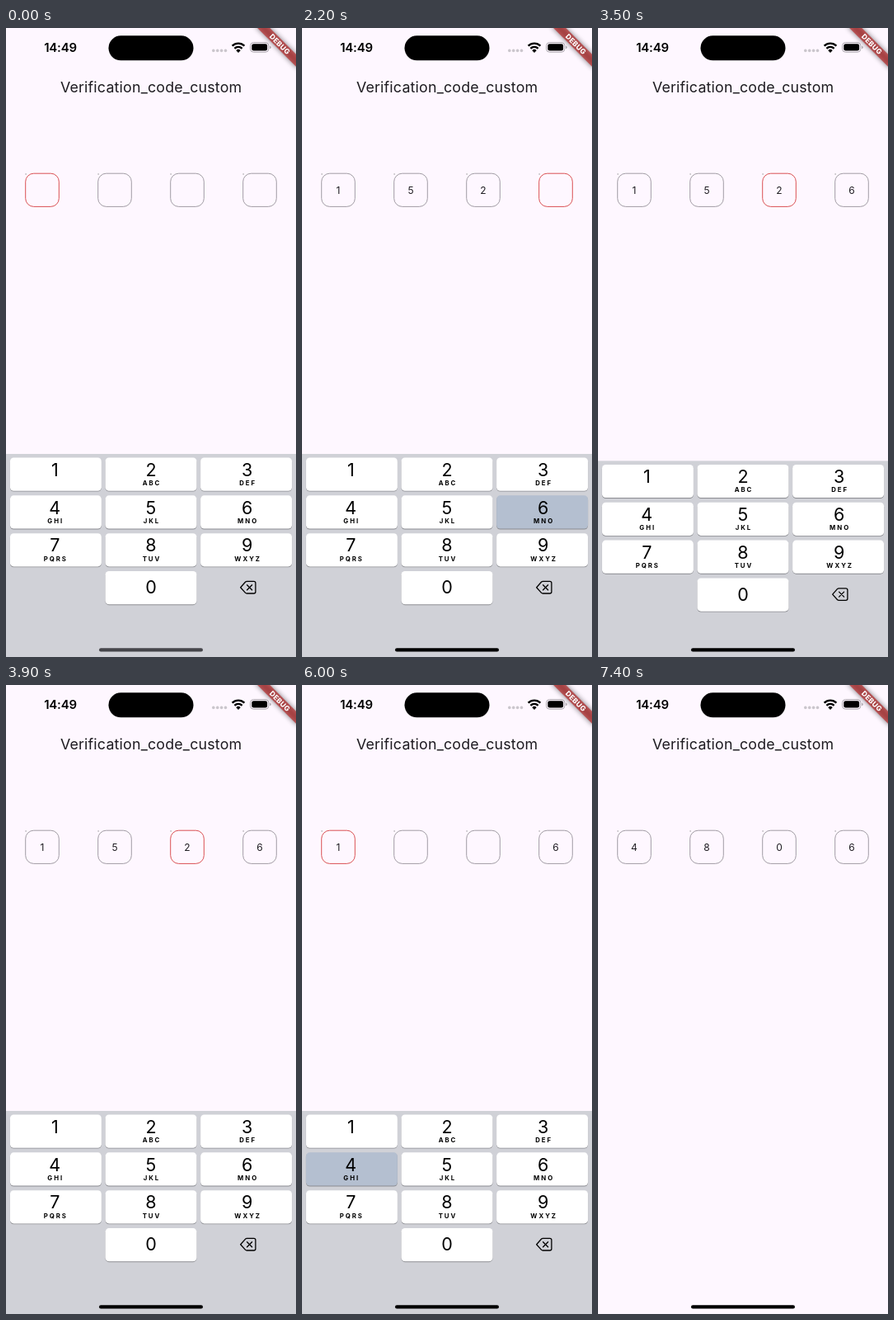
Recreate the animation shown at these times as an HTML page. Size 352 by 762 pixels, loop 8 s.

```html
<!DOCTYPE html>
<html lang="en">
<head>
<meta charset="utf-8">
<title>Verification code</title>
<style>
  html, body { margin: 0; width: 100%; height: 100%; overflow: hidden; background: #fef7ff; }
  svg { display: block; width: 100%; height: 100%; }
  text { font-family: Inter, "Open Sans", sans-serif; text-anchor: middle; fill: #000; }
  .title { font-size: 17.8px; letter-spacing: .2px; fill: #1d1b20; }
  .clock { font-size: 15px; font-weight: 600; letter-spacing: -.2px; }
  .banner { font-size: 9.6px; font-weight: 800; letter-spacing: .3px; fill: #fff; }
  .cell rect { fill: none; stroke: #a19ca4; }
  .cell.focused rect { stroke: #da5053; }
  .cell text { font-size: 12px; fill: #1d1b20; }
  .key rect { fill: #fff; }
  .key .edge { fill: #8b8c91; }
  .key.pressed .face { fill: #b4bfd0; }
  .digit { font-size: 21.5px; }
  .letters { font-size: 7.8px; font-weight: 700; letter-spacing: 2px; }
  .line { fill: none; stroke: #000; }
</style>
</head>
<body>
<svg viewBox="0 0 352 762">
  <defs>
    <filter id="soft" x="-50%" y="-150%" width="200%" height="400%">
      <feGaussianBlur stdDeviation="3.6"/>
    </filter>
  </defs>
  <rect width="352" height="762" fill="#fef7ff"/>

  <text class="clock" x="66" y="29.3">14:49</text>
  <rect x="124.5" y="9.3" width="103" height="30" rx="15"/>
  <g fill="#cbc6cd">
    <circle cx="251.8" cy="27.4" r="1.8"/><circle cx="256.7" cy="27.4" r="1.8"/>
    <circle cx="261.6" cy="27.4" r="1.8"/><circle cx="266.5" cy="27.4" r="1.8"/>
  </g>
  <g class="line" stroke-width="2.4">
    <path d="M274.6 21.6A10.6 10.6 0 0 1 289.4 21.6"/>
    <path d="M277.4 24.8A6.5 6.5 0 0 1 286.6 24.8"/>
  </g>
  <path d="M282 30L279.3 27.2A3.8 3.8 0 0 1 284.7 27.2Z"/>
  <rect x="296.6" y="17.6" width="22.2" height="11.6" rx="3.8" fill="none" stroke="#aca7ae"/>
  <rect x="298.3" y="19.3" width="18.8" height="8.2" rx="2.3"/>
  <path d="M320.2 21.5q1.5 .6 1.5 1.9t-1.5 1.9z" fill="#aca7ae"/>

  <text class="title" x="176.1" y="77.8">Verification_code_custom</text>
  <g id="cells"></g>

  <g id="keyboard">
    <rect y="516" width="352" height="246" fill="#d0d1d7"/>
    <g id="keys"></g>
    <g class="line" stroke-width="1.3" stroke-linejoin="round" stroke-linecap="round">
      <path d="M284.7 677.7L290.4 671.3Q291.2 670.4 292.4 670.4H300.8Q302.9 670.4 302.9 672.5V682.9Q302.9 685 300.8 685H292.4Q291.2 685 290.4 684.1Z"/>
      <path d="M292.6 674.7l6 6m0-6l-6 6"/>
    </g>
  </g>
  <rect id="home" x="113" y="751.3" width="126" height="4.3" rx="2.1"/>

  <g transform="translate(352 0) rotate(45) scale(.8957)">
    <rect x="-40" y="25" width="80" height="12" opacity=".5" filter="url(#soft)"/>
    <rect x="-40" y="25" width="80" height="12" fill="#b71c1c" fill-opacity=".63"/>
    <text class="banner" x="0" y="34.5">DEBUG</text>
  </g>
</svg>
<script>
const LOOP = 8000, TICK = 100, KEYBOARD_HEIGHT = 246;

// [start, cell contents, focused cell]
const ENTRIES = [
  [0, "    ", 0], [500, "1   ", 1], [800, "15  ", 2], [1200, "152 ", 3],
  [2400, "1526", -1], [3300, "1526", 2], [4400, "15 6", 1], [4700, "1  6", 0],
  [6200, "4  6", 1], [6500, "48 6", 2], [6900, "4806", -1]
];
// [key, down, up]
const PRESSES = [
  [1, 300, 500], [5, 700, 800], [2, 1100, 1200], [6, 2200, 2400],
  [4, 6000, 6200], [8, 6400, 6500], [0, 6800, 6900]
];
// [start, direction]: 1 hides the keyboard, -1 shows it
const SLIDES = [[2315, 1], [3215, -1], [6815, 1]];
const LETTERS = ["", "", "ABC", "DEF", "GHI", "JKL", "MNO", "PQRS", "TUV", "WXYZ"];

const byId = id => document.getElementById(id);

function addGroup(parent, className, markup) {
  const group = document.createElementNS("http://www.w3.org/2000/svg", "g");
  group.setAttribute("class", className);
  group.innerHTML = markup;
  parent.append(group);
  return group;
}

const cells = [0, 1, 2, 3].map(i => {
  const x = 23.7 + i * 88;
  return addGroup(byId("cells"), "cell", `
    <rect x="${x}" y="176.2" width="40.6" height="40.2" rx="10"/>
    <path d="M${x - .2} 176.4h1.2v1h-1.2z" fill="#777"/>
    <text x="${x + 20.3}" y="200.7"></text>`);
});

const keys = LETTERS.map((letters, n) => {
  const col = n ? (n - 1) % 3 : 1, row = n ? Math.floor((n - 1) / 3) : 3;
  const x = 4.9 + col * 115.6, y = 520.5 + row * 45.85;
  const mid = 176 + (col - 1) * 116.7;
  return addGroup(byId("keys"), "key", `
    <rect class="edge" x="${x}" y="${y + .9}" width="111" height="40.2" rx="4.5"/>
    <rect class="face" x="${x}" y="${y}" width="111" height="40.2" rx="4.5"/>
    <text class="digit" x="${mid}" y="${y + (n ? 22.2 : 27.3)}">${n}</text>
    <text class="letters" x="${mid + 1}" y="${y + 33.6}">${letters}</text>`);
});

// Critically damped spring, 0 to 1
function spring(ms) {
  const k = Math.max(0, ms) * .01826;
  return 1 - (1 + k) * Math.exp(-k);
}

function draw(t) {
  const [, digits, focus] = ENTRIES.findLast(([start]) => start <= t);
  cells.forEach((cell, i) => {
    cell.classList.toggle("focused", i === focus);
    cell.querySelector("text").textContent = digits[i].trim();
  });
  keys.forEach((key, n) => key.classList.toggle("pressed",
    PRESSES.some(([k, down, up]) => k === n && t >= down && t < up)));
  const hidden = SLIDES.reduce((sum, [start, dir]) => sum + dir * spring(t - start), 0);
  byId("keyboard").setAttribute("transform", `translate(0 ${hidden * KEYBOARD_HEIGHT})`);
  byId("home").setAttribute("fill", t < 500 ? "#46464b" : "#000");
}

const origin = performance.now();
function frame() {
  const t = (performance.now() - origin) % LOOP;
  draw(Math.floor(t / TICK) * TICK);
  requestAnimationFrame(frame);
}
frame();
</script>
</body>
</html>
```
